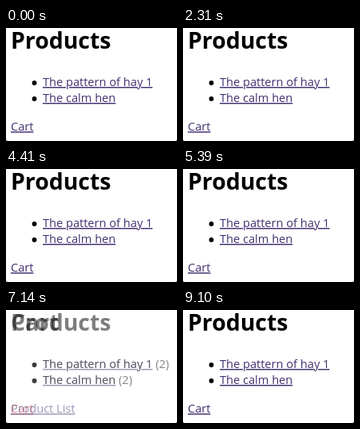
Animation, 214 px wide and 142 px high, one loop 9.38 s. Source, as an HTML page:

```html
<!DOCTYPE html>
<html lang="en">
<head>
<meta charset="utf-8">
<title>Products and cart</title>
<style>
  html, body { margin: 0; width: 100%; height: 100%; overflow: hidden; background: #fff; }
  svg { display: block; width: 214px; height: 142px; }
  text { font: 14.6px "Open Sans", "Noto Sans", sans-serif; fill: #111; }
  .title { font-size: 28.4px; font-weight: 700; fill: #000; }
  .link { fill: #43306f; text-decoration: underline; text-decoration-thickness: 1px; text-underline-offset: 2px; }
  .link.pressed { fill: #b3202b; }
</style>
</head>
<body>
<svg id="stage" viewBox="0 0 214 142" xmlns="http://www.w3.org/2000/svg">
  <rect width="214" height="142" fill="#fff"/>
</svg>
<script>
const LOOP = 9380;
const STEP = 70;
const ITEMS = ["The pattern of hay 1", "The calm hen"];

// Each visit to the cart: fade in from..to, fade out from..to, item count.
const VISITS = [
  [1120, 1400, 2170, 2310, 1],
  [2870, 3150, 3850, 4130, 1],
  [4410, 4550, 5180, 5390, 1],
  [5670, 5880, 6580, 6860, 2],
  [7070, 7210, 7630, 7910, 2],
  [8190, 8470, 8820, 9100, 2]
];

const stage = document.getElementById("stage");

function add(parent, tag, attrs, content = "") {
  const node = document.createElementNS("http://www.w3.org/2000/svg", tag);
  for (const key in attrs) node.setAttribute(key, attrs[key]);
  node.textContent = content;
  return parent.appendChild(node);
}

function makePage(title, itemClass, linkText) {
  const group = add(stage, "g", {});
  add(group, "text", { x: 6, y: 26, class: "title" }, title);
  const items = ITEMS.map((name, i) => {
    add(group, "circle", { cx: 35.5, cy: 69 + 20 * i, r: 2.9, fill: "#000" });
    return add(group, "text", { x: 46, y: 73 + 20 * i, class: itemClass }, name);
  });
  const link = add(group, "text", { x: 6, y: 129, class: "link" }, linkText);
  return { group, items, link };
}

const products = makePage("Products", "link", "Cart");
const cart = makePage("Cart", "item", "Product List");

// Rounded lower window corners.
add(stage, "path", { d: "M0 139.5Q0 142 2.5 142H0ZM214 139.5Q214 142 211.5 142H214Z", fill: "#555" });

const ease = p => p * p * (3 - 2 * p);
const progress = (t, from, to) => ease(Math.min(1, Math.max(0, (t - from) / (to - from))));

function render(time) {
  const t = Math.floor((time % LOOP) / STEP) * STEP;
  const visit = VISITS.find(v => t < v[3]) || VISITS[VISITS.length - 1];
  const [enter, entered, leave, left, count] = visit;
  const shown = progress(t, enter, entered) - progress(t, leave, left);

  products.group.setAttribute("opacity", 1 - shown);
  cart.group.setAttribute("opacity", shown);
  cart.items.forEach((item, i) => { item.textContent = `${ITEMS[i]} (${count})`; });
  products.link.classList.toggle("pressed", t > enter && t < entered);
  cart.link.classList.toggle("pressed", t >= leave && t < left);
}

const start = performance.now();
function tick() {
  render(performance.now() - start);
  requestAnimationFrame(tick);
}
tick();
</script>
</body>
</html>
```
